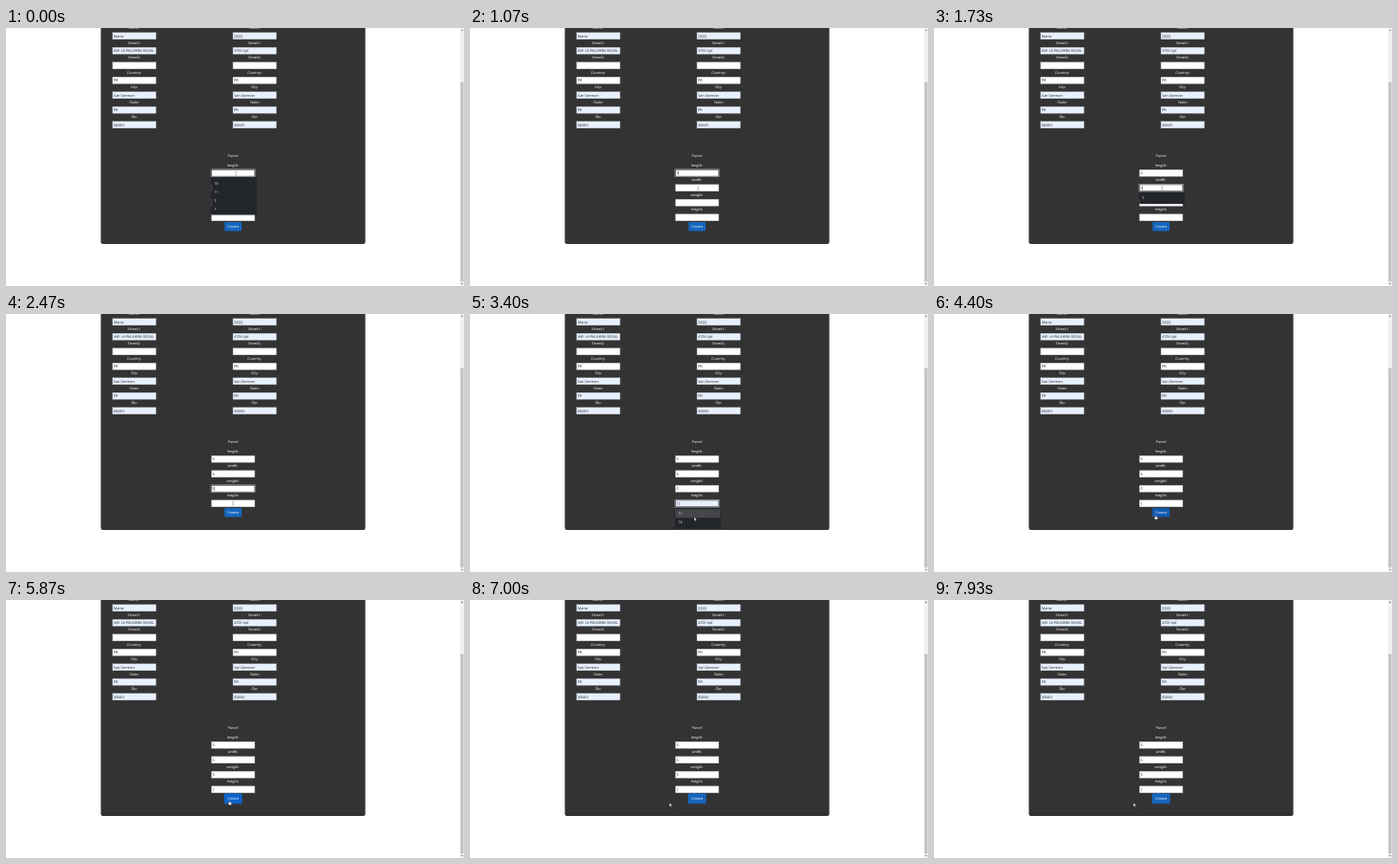
Recreate the animation shown at these times as an HTML page. Size 480 px wide and 270 px high, loop 8 s.

```html
<!DOCTYPE html>
<html lang="en">
<head>
<meta charset="utf-8">
<title>Parcel form</title>
<style>
  html, body { margin: 0; width: 100%; height: 100%; overflow: hidden; background: #fff; }
  svg { display: block; width: 100%; height: 100%; }
  text { font: 3.8px "Open Sans", "Noto Sans", sans-serif; text-rendering: geometricPrecision; }
  .label { fill: #fff; text-anchor: middle; }
  .value { fill: #222; }
  .item { fill: #eee; }
</style>
</head>
<body>
<svg viewBox="0 0 480 270">
  <defs>
    <clipPath id="left"><rect x="112" y="0" width="45" height="110"/></clipPath>
    <clipPath id="right"><rect x="238" y="0" width="45" height="110"/></clipPath>
  </defs>
  <g id="page"></g>
  <g id="live"></g>
</svg>
<script>
const LOOP = 8000, FRAME = 1000 / 15, PITCH = 15.5, ROW = 9;
const FIELD = { w: 45.5, h: 7.2 };
const PARCEL = { x: 215.3, y: 148.2 };
const BUTTON = { x: 229, y: 202.9, w: 18, h: 9.7 };
const page = document.getElementById('page');
const live = document.getElementById('live');

const rect = (x, y, w, h, fill, more = '') =>
  `<rect x="${x}" y="${y}" width="${w}" height="${h}" fill="${fill}" ${more}/>`;
const text = (x, y, s, kind, more = '') =>
  `<text x="${x}" y="${y}" class="${kind}" ${more}>${s}</text>`;
const field = (x, y, fill) =>
  rect(x, y, FIELD.w, FIELD.h, fill, 'stroke="#999" stroke-width=".3"');

const labels = ['Name:', 'Street1:', 'Street2:', 'Country:', 'City:', 'State:', 'Zip:'];
const columns = [
  { x: 111.7, clip: 'left', values: ['Marta', 'AVE LA PALMERA ROSAL', '', 'PR', 'San German', 'PR', '00683'] },
  { x: 237.9, clip: 'right', values: ['QQQ', '4706 kjd', '', 'PR', 'San German', 'PR', '00683'] }
];

function drawPage() {
  let out = '<path d="M99.4 0H376.6V224Q376.6 226 374.6 226H101.4Q99.4 226 99.4 224Z" fill="#333"/>';
  for (const col of columns) {
    labels.forEach((name, i) => {
      const y = 4.7 + PITCH * i;
      const auto = i !== 2 && i !== 3;
      out += text(col.x + FIELD.w / 2, y - 3.4, name, 'label')
        + field(col.x, y, auto ? '#e8f0fe' : '#fff')
        + text(col.x + 1.1, y + 5, col.values[i], 'value', `clip-path="url(#${col.clip})"`);
    });
  }
  out += text(238, 134.8, 'Parcel', 'label');
  ['length:', 'width:', 'weight:', 'height:'].forEach((name, i) => {
    out += text(238, PARCEL.y + PITCH * i - 3.4, name, 'label');
  });
  out += rect(475.8, 0, 4.2, 270, '#f1f1f1') + rect(476.3, 56.7, 3.2, 208.6, '#c1c1c1')
    + '<path d="M476.9 3L478 1.6L479.1 3Z M476.9 267L478 268.4L479.1 267Z" fill="#666"/>';
  page.innerHTML = out;
}

// time, focused field, values, suggestions
const sizes = ['10', '11', '5', '7'];
const states = [
  [0, 0, ['', '', '', ''], sizes],
  [600, 0, ['5', '', '', ''], ['5']],
  [733, 0, ['5', '', '', ''], []],
  [1270, 1, ['5', '', '', ''], sizes],
  [1730, 1, ['5', '5', '', ''], ['5']],
  [1870, 1, ['5', '5', '', ''], []],
  [2130, 2, ['5', '5', '', ''], sizes],
  [2270, 2, ['5', '5', '5', ''], ['5']],
  [2330, 2, ['5', '5', '5', ''], []],
  [2870, 3, ['5', '5', '5', ''], ['11', '14', '5', '7', '6', '8']],
  [3070, 3, ['5', '5', '5', '1'], ['11', '14']],
  [3870, -1, ['5', '5', '5', '1'], []],
  [4870, 4, ['5', '5', '5', '1'], []]
];

// time, x, y of the pointer
const moves = [
  [0, 241, 151.8], [1010, 241, 151.8], [1070, 239, 168], [1930, 239, 168],
  [2070, 239, 183], [2335, 239, 183], [2470, 238, 198], [3070, 238, 198],
  [3270, 235.5, 208], [3400, 235, 212.5], [3535, 235, 212.5], [3800, 197, 214.5],
  [4000, 197, 214.5], [4400, 232, 210.5], [4530, 234, 210], [6665, 234, 210],
  [7000, 209, 212.3], [LOOP, 209, 212.3]
];

function pointerAt(t) {
  const n = Math.max(1, moves.findIndex(m => m[0] > t));
  const [a, b] = [moves[n - 1], moves[n]];
  const k = (t - a[0]) / (b[0] - a[0]);
  return { x: a[1] + (b[1] - a[1]) * k, y: a[2] + (b[2] - a[2]) * k };
}

const inside = (p, x, y, w, h) => p.x >= x && p.x <= x + w && p.y >= y && p.y <= y + h;

const shapes = {
  beam: '<path d="M-.6-1.8H.6M0-1.8V1.8M-.6 1.8H.6" fill="none" stroke="#555" stroke-width=".4"/>',
  arrow: '<path d="M0 0V4L.9 3.2L1.5 4.5L2.1 4.2L1.5 2.9H2.8Z" fill="#fff" stroke="#111" stroke-width=".3"/>',
  hand: '<path d="M-.4.3Q0-.3.4.3V1.6L2.1 2Q2.6 2.2 2.4 3L2 4.5H-.3L-1.5 2.7Q-1.3 2.1-.4 2.7Z" fill="#fff" stroke="#111" stroke-width=".3"/>'
};

function drawButton(t, hover, focused) {
  const { x, y, w, h } = BUTTON;
  const pressed = t >= 4870 && t < 5000;
  const fill = pressed ? '#0a4fa6' : focused && hover ? '#0d62cc' : hover ? '#135bb0' : '#1766bd';
  const ring = focused ? rect(x - .8, y - .8, w + 1.6, h + 1.6, '#1d5ca8', 'rx="1.6" opacity=".8"') : '';
  return ring + rect(x, y, w, h, fill, 'rx="1"') + text(238, 209.2, 'Create', 'label');
}

function drawLive(t) {
  const [, focus, values, items] = states.findLast(s => s[0] <= t);
  const p = pointerAt(t);
  const top = PARCEL.y + PITCH * focus + FIELD.h + .8;
  const first = top + 1.6;
  const popH = items.length * ROW + 3.2;
  const onPopup = items.length > 0 && inside(p, PARCEL.x, top, 47, popH);
  const hot = onPopup ? Math.min(items.length - 1, Math.max(0, Math.floor((p.y - first) / ROW))) : -1;
  const onButton = !onPopup && inside(p, BUTTON.x, BUTTON.y, BUTTON.w, BUTTON.h);
  let onField = false;
  let out = drawButton(t, onButton, focus === 4);

  values.forEach((value, i) => {
    const y = PARCEL.y + PITCH * i;
    const preview = i === focus && hot >= 0;
    onField = onField || inside(p, PARCEL.x, y, FIELD.w, FIELD.h);
    out += field(PARCEL.x, y, preview ? '#e8f0fe' : '#fff');
    if (i === focus) {
      out += rect(PARCEL.x - .3, y - .3, FIELD.w + .6, FIELD.h + .6, 'none', 'stroke="#ccc" stroke-width=".5"')
        + rect(PARCEL.x + .3, y + .3, FIELD.w - .6, FIELD.h - .6, 'none', 'stroke="#444" stroke-width=".5"');
      if (t >= 270 && !preview) {
        out += rect(PARCEL.x + 1.2 + value.length * 2.2, y + 1.3, .3, 4.6, '#222');
      }
    }
    out += text(PARCEL.x + 1.1, y + 5, preview ? items[hot] : value, 'value');
  });

  if (items.length) {
    out += rect(PARCEL.x - .6, top, 48.2, popH + .8, '#000', 'opacity=".18" rx="1"')
      + rect(PARCEL.x, top, 47, popH, '#22252a', 'rx=".6"');
    items.forEach((item, i) => {
      const y = first + ROW * i;
      if (i === hot) out += rect(PARCEL.x, y, 47, ROW, '#45474a');
      out += text(PARCEL.x + 2.9, y + 5.9, item, 'item');
    });
  }

  const shape = onPopup ? 'arrow' : onButton ? 'hand' : onField ? 'beam' : 'arrow';
  live.innerHTML = out + `<g transform="translate(${p.x} ${p.y})">${shapes[shape]}</g>`;
}

let last = -1;
function tick(now) {
  const step = Math.floor((now % LOOP + 4) / FRAME);
  if (step !== last) {
    last = step;
    drawLive(Math.min(LOOP - 1, step * FRAME + 5));
  }
  requestAnimationFrame(tick);
}

drawPage();
drawLive(0);
requestAnimationFrame(tick);
</script>
</body>
</html>
```
